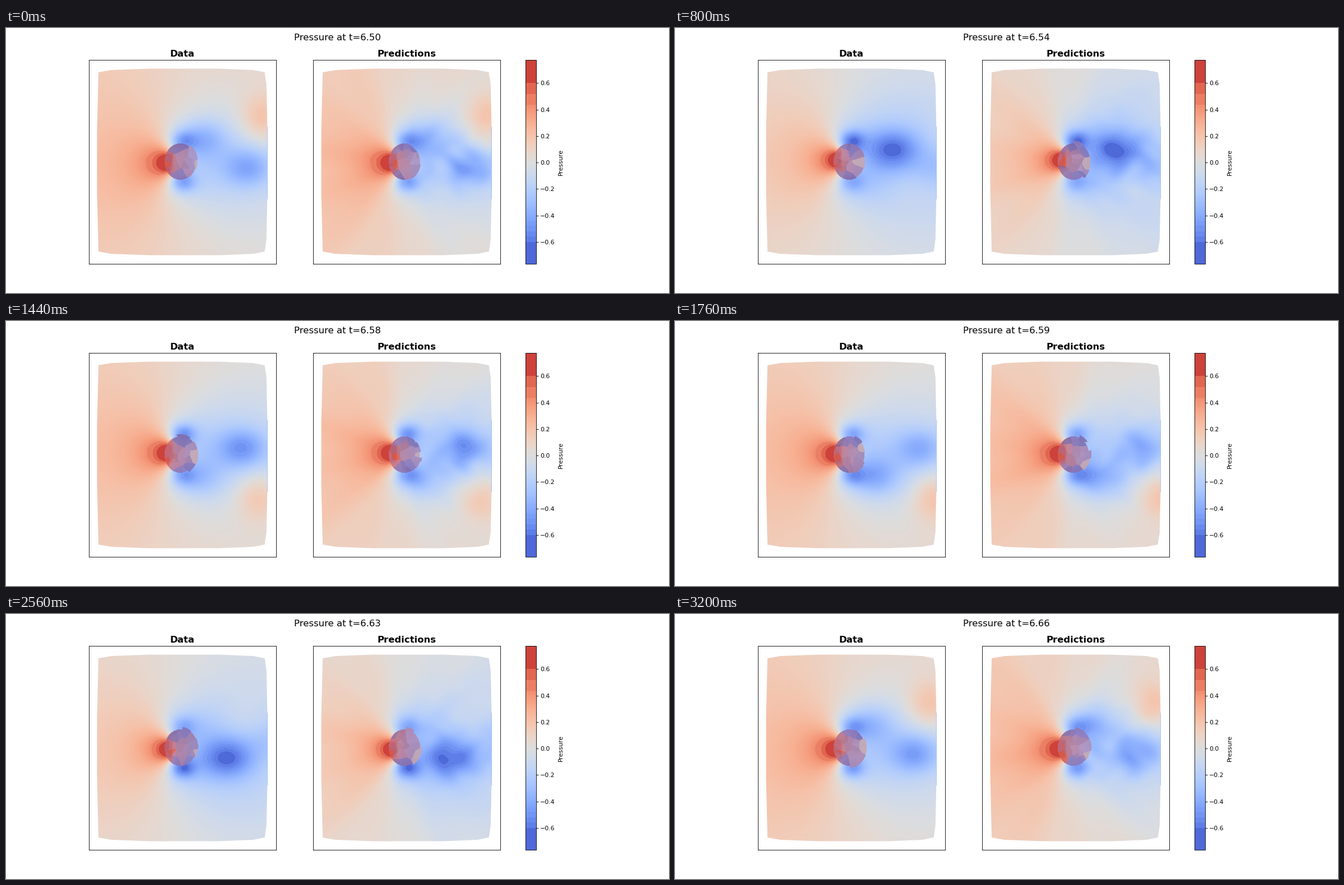
Recreate the animation shown at these times as a matplotlib script. Size 1183 by 473 pixels, loop 3360 ms.

```python
import numpy as np
import matplotlib.pyplot as plt
from matplotlib.animation import FuncAnimation
from matplotlib.cm import ScalarMappable
from matplotlib.colors import ListedColormap, Normalize
from matplotlib.patches import Polygon

W, H, DPI = 1183, 473, 79
FRAMES, INTERVAL = 21, 160
PERIOD = 20.6                 # frames per shedding cycle
CX, CY = 311, 239             # cylinder centre, in stage pixels
VMIN, VMAX = -0.766, 0.774

plt.rcParams["font.family"] = "DejaVu Sans"


def banded_map():
    """Coolwarm whose strong ends are merged into flat bands."""
    v = np.linspace(VMIN, VMAX, 256)
    size = np.abs(v)
    step = np.where(v > 0, 0.08, 0.04)
    bands = 0.44 + (np.floor((size - 0.44) / step) + 0.5) * step
    size = np.where(size > 0.44, bands, size)
    size = np.where(np.abs(v) > 0.6, 0.66, size)
    return ListedColormap(plt.get_cmap("coolwarm")(
        (np.sign(v) * size - VMIN) / (VMAX - VMIN)))


cmap, norm = banded_map(), Normalize(VMIN, VMAX)

# Coordinates relative to the cylinder, y upwards
X, Y = np.meshgrid(np.arange(162, 468) + 0.5 - CX,
                   CY - np.arange(72, 406) - 0.5)
R = np.hypot(X, Y)
THETA = np.arctan2(Y, X)


def bell(s, width):
    return np.exp(-(s / width) ** 2 / 2)


def blob(x, y, sx, sy, amp, spread=3):
    """Gaussian core with a wide halo."""
    core = bell(X - x, sx) * bell(Y - y, sy)
    halo = bell(X - x, sx * spread) * bell(Y - y, sy * spread)
    return amp * (0.77 * core + 0.23 * halo)


def cycle(n, lag=0):
    return np.cos(2 * np.pi * (n - lag) / PERIOD)


def body_field(n):
    """Stagnation pressure in front, softened suction behind."""
    y = Y - 3.5 * cycle(n, 7)
    r2 = np.maximum(X ** 2 + y ** 2, 400)
    r = np.sqrt(r2)
    c = np.clip(-X / r, 0, 1)
    sharp = 1 + 1.1 * np.exp(-np.maximum(r - 30, 0) / 35)
    front = 23 * c ** sharp / r + 120 * c * (2 * c ** 2 - 1) / r2
    back = -22 * X / (r2 + 70 ** 2)
    return np.where(X < 0, front, back)


def side_field(n, side):
    """Suction, drifting vortex and high patch of one side of the wake."""
    p = -blob(5, side * 36, 15, 13, 0.39 + 0.13 * cycle(n, 6), 2.2)
    for s in (n - PERIOD, n, n + PERIOD):
        x = max(39 + 8 * s, 10)
        y = 10 + 32 / (1 + np.exp((s - 4) / 1.6))
        p -= blob(x, side * y, 31, 24, 0.49 * bell(s - 6, 6))
        p += blob(146 + 7 * s, side * (76 - 1.1 * s ** 2), 28, 30,
                  0.28 * bell(s, 3))
    return p


def pressure(n):
    p = 0.05 + 0.035 * cycle(2 * n) + body_field(n)
    return p + side_field(n, 1) + side_field((n + PERIOD / 2) % PERIOD, -1)


wave_rng = np.random.default_rng(4)
WAVES = wave_rng.uniform((0.03, -0.16, 0), (0.13, 0.16, 6.3), (9, 3))
WAKE = bell(X - 85, 60) * bell(Y, 45) * np.clip(X / 25, 0, 1)


def ripple(n):
    """Rough wake and faint rays of the predicted field."""
    bend_x = X + 6 * np.sin(Y / 13 + n)
    bend_y = Y + 5 * np.sin(X / 15 - 0.7 * n)
    rough = sum(np.sin(kx * (bend_x - 8 * n) + ky * bend_y + ph)
                for kx, ky, ph in WAVES)
    rays = np.sin(7 * THETA + 0.8 * n) + np.sin(13 * THETA - 1.1 * n)
    return 0.015 * rough * WAKE + 0.009 * rays * np.clip((R - 40) / 80, 0, 1)


RED, LILAC = np.array([190, 104, 122]), np.array([162, 138, 184])
EDGE, PALE, HOT = np.array([112, 104, 182]), (198, 165, 172), (212, 92, 82)


def paint_body(rgb, n, seed):
    """Faceted translucent cylinder over the field."""
    rng = np.random.default_rng(100 * seed + n)
    count = 22
    ang = rng.uniform(0, 2 * np.pi, count)
    rad = np.sqrt(rng.uniform(0, 1, count))
    sx, sy = 29 * rad * np.cos(ang), 32 * rad * np.sin(ang)

    t = np.clip((sx + 24) / 48, 0, 1)[:, None]
    tone = RED * (1 - t) + LILAC * t
    rim = (np.abs(sy) > 18)[:, None]
    tone = np.where(rim, 0.4 * tone + 0.6 * EDGE, tone)
    tone += rng.uniform(-9, 9, (count, 1))
    tone[np.argmax(sx)] = PALE
    tone[np.argmin(np.hypot(sx + 20, sy + 6))] = HOT
    reach = np.where(sx > 8, rng.uniform(0.96, 1.15, count), 1)

    rows, cols = np.nonzero((np.abs(X) < 36) & (np.abs(Y) < 38))
    px, py = X[rows, cols], Y[rows, cols]
    cell = np.argmin((px[:, None] - sx) ** 2 + (py[:, None] - sy) ** 2, axis=1)
    inside = np.hypot(px / 28, py / 32) < reach[cell]
    rows, cols, cell = rows[inside], cols[inside], cell[inside]
    rgb[rows, cols] = 0.15 * rgb[rows, cols] + 0.85 * tone[cell] / 255


def picture(n, predicted):
    p = pressure(n)
    if predicted:
        p = p + ripple(n)
    rgb = cmap(norm(p))[..., :3]
    paint_body(rgb, n, 2 if predicted else 1)
    return np.clip(rgb, 0, 1)


# Upper half of the domain edge, mirrored to close it
upper = [(162.5, 185), (165, 79), (188, 75), (255, 72.5), (380, 72.5),
         (441, 75), (461.5, 79), (464.7, 100), (466.5, 185)]
OUTLINE = upper + [(x, 2 * CY - y) for x, y in reversed(upper)]

fig, axes = plt.subplots(1, 2, figsize=(W / DPI, H / DPI), dpi=DPI)
fig.subplots_adjust(left=0.1252, right=0.9002, bottom=0.1092, top=0.8792)
bar = fig.colorbar(ScalarMappable(norm, cmap), ax=list(axes))
bar.set_label("Pressure", labelpad=4.6)
bar.set_ticks(np.arange(-3, 4) * 0.2)
heading = fig.suptitle("", fontsize=15, y=0.9788)

images = []
for ax, name, predicted in zip(axes, ("Data", "Predictions"), (False, True)):
    im = ax.imshow(picture(0, predicted), extent=(162, 468, 406, 72),
                   aspect="auto", interpolation="nearest")
    shape = Polygon(OUTLINE, transform=ax.transData, fc="none", ec="none")
    ax.add_patch(shape)
    im.set_clip_path(shape)
    ax.plot([466.2, 466.2], [176, 305], color="#8fb0fe", lw=0.6)
    ax.set_xlim(148.1, 481.5)
    ax.set_ylim(421.3, 57.1)
    ax.set_xticks([])
    ax.set_yticks([])
    ax.set_title(name, fontsize=15, fontweight="bold")
    images.append(im)


def update(n):
    heading.set_text(f"Pressure at t={6.5022 + 0.0081 * n:.2f}")
    for im, predicted in zip(images, (False, True)):
        im.set_data(picture(n, predicted))
    return [heading, *images]


anim = FuncAnimation(fig, update, frames=FRAMES, interval=INTERVAL,
                     repeat=True, repeat_delay=0, blit=False)
plt.show()
```
